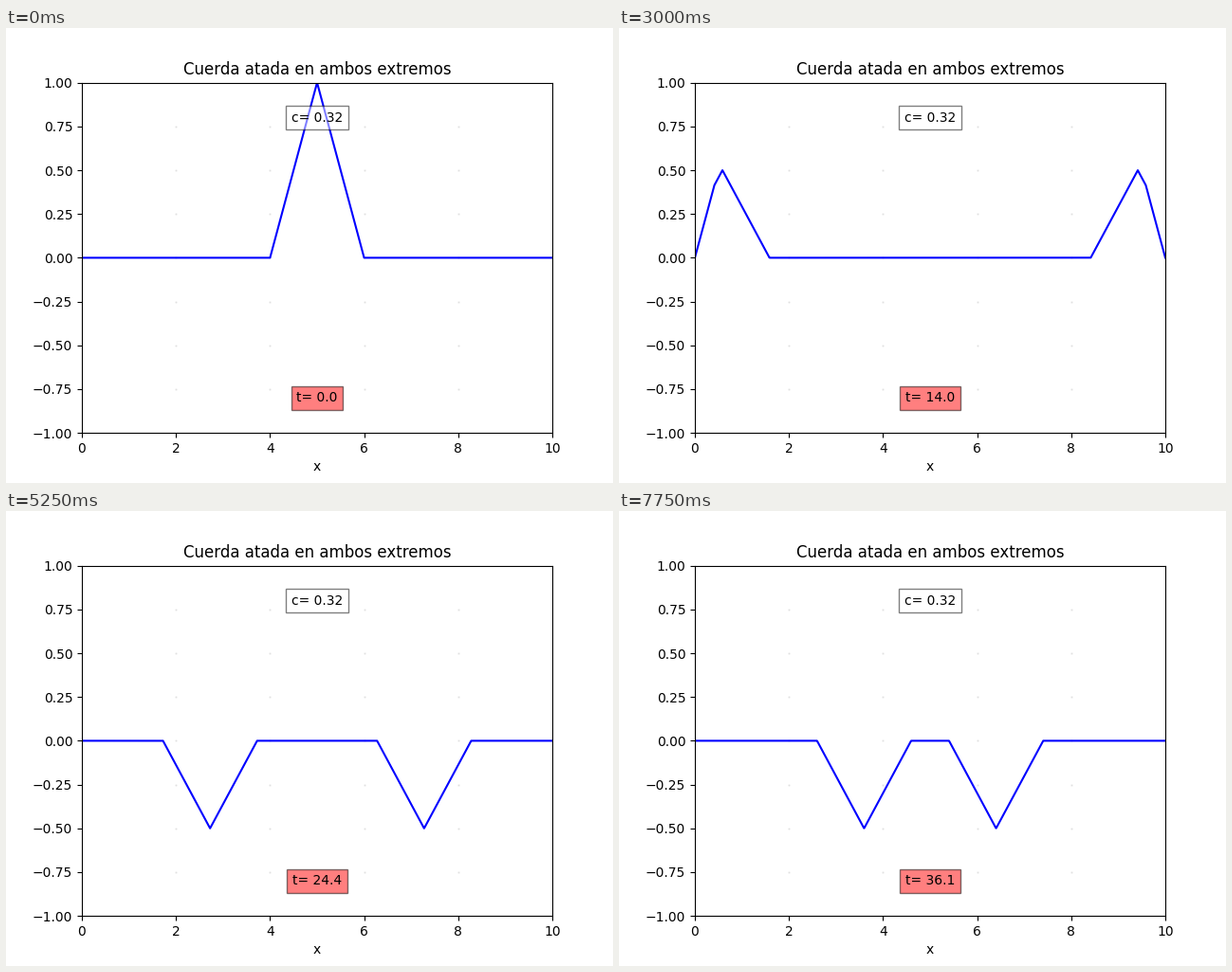
Write a matplotlib script that moves like this. It is 640 by 480 pixels and loops after 8 s.

```python
import numpy as np
import matplotlib.pyplot as plt
from matplotlib.animation import FuncAnimation

LENGTH = 10
SPEED = np.sqrt(0.1)
TIME_STEP = 1.1632
FRAMES = 32
INTERVAL = 250

x = np.linspace(0, LENGTH, 2001)


def pluck(s):
    """Triangular pulse, extended as an odd function of period 2 * LENGTH."""
    s = (s + LENGTH) % (2 * LENGTH) - LENGTH
    return np.sign(s) * np.clip(1 - np.abs(np.abs(s) - LENGTH / 2), 0, None)


def string(t):
    """D'Alembert solution for a string tied at both ends."""
    shift = SPEED * t
    return (pluck(x - shift) + pluck(x + shift)) / 2


fig, ax = plt.subplots(figsize=(6.4, 4.8), dpi=100)
ax.set(xlim=(0, LENGTH), ylim=(-1, 1), xlabel="x",
       title="Cuerda atada en ambos extremos")

# Faint dots at the grid crossings
gx, gy = np.meshgrid(np.arange(2, LENGTH, 2), np.arange(-0.75, 1, 0.25))
ax.plot(gx.ravel(), gy.ravel(), "s", color="#e0e0e0", ms=1.3, mew=0, zorder=1)

line, = ax.plot([], [], color="blue", lw=1.5)


def label(y, text, color):
    return ax.text(LENGTH / 2, y, text, ha="center", va="center",
                   bbox=dict(facecolor=color, alpha=0.5))


label(0.8, f"c= {SPEED:.2f}", "white")
clock = label(-0.8, "t= 0.0", "red")


def update(i):
    t = i * TIME_STEP
    line.set_data(x, string(t))
    clock.set_text(f"t= {t:.1f}")
    return line, clock


anim = FuncAnimation(fig, update, frames=FRAMES, interval=INTERVAL,
                     repeat=True, repeat_delay=0)
plt.show()
```
